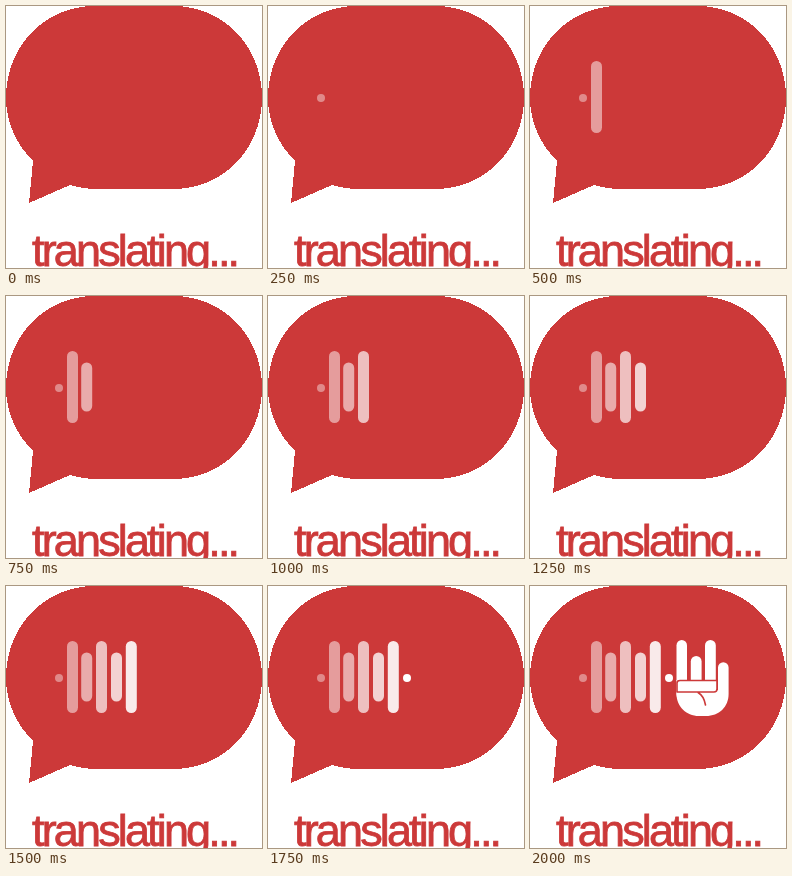
These frames come from a looping animation (256 px wide and 262 px high, 2.25 s). An HTML page:

```html
<!DOCTYPE html>
<html lang="en">
<head>
<meta charset="utf-8">
<title>translating...</title>
<style>
  html, body { margin: 0; width: 100%; height: 100%; overflow: hidden; background: #fff; }
  svg { display: block; width: 256px; height: 262px; }
  text { font: 45px "Liberation Sans", Arial, sans-serif; letter-spacing: -2.85px; stroke-width: .8; }
  .red { fill: #cc3939; stroke: #cc3939; }
  .line { fill: none; stroke: #cc3939; stroke-width: 1.6; stroke-linecap: round; stroke-linejoin: round; }
  .part { fill: #fff; opacity: 0; }
</style>
</head>
<body>
<svg viewBox="0 0 256 262">
  <path fill="#cc3939" shape-rendering="crispEdges" d="M89 0H167C218 0 256 41 256 91.500S218 183 167 183H91Q77 183 64 179L23 197L27 155C10 138 0 116 0 91.500C0 41 38 0 89 0Z"/>
  <text class="red" x="26" y="259.500">translating...</text>
  <g id="wave"></g>
  <g id="hand" class="part">
    <rect x="146.500" y="54" width="10.500" height="60" rx="5.250"/>
    <rect x="160.800" y="70" width="10.800" height="40" rx="5.400"/>
    <rect x="175" y="54" width="10.800" height="60" rx="5.400"/>
    <path d="M146.500 94H187V104H188V81.500A5.300 5.300 0 0 1 198.600 81.500V108C198.600 121 189 130 176 130H169C156 130 146.500 120 146.500 108Z"/>
    <path class="line" d="M147 106V97Q147 94.500 150 94.500H187V103Q187 106 184 106H147M168 106.500Q174 110 175.500 119"/>
  </g>
</svg>
<script>
const STEP = 250, LOOP = 2250, MID = 92;
const wave = document.getElementById("wave");

// centre x, width, height, opacity; one part per step
const parts = [
  [53, 8, 8, .41],
  [66.5, 11, 72, .5],
  [80.7, 11, 49, .58],
  [95.5, 11, 72, .68],
  [110.5, 11, 49, .78],
  [125.3, 11, 72, .9],
  [139, 8, 8, 1]
];

function reveal(el, step, opacity) {
  const offset = step * STEP / LOOP;
  el.animate([
    { opacity: 0, offset: 0 },
    { opacity: 0, offset },
    { opacity, offset },
    { opacity, offset: 1 }
  ], { duration: LOOP, iterations: Infinity });
}

function bar([x, width, height, opacity], i) {
  const el = document.createElementNS("http://www.w3.org/2000/svg", "rect");
  const box = { x: x - width / 2, y: MID - height / 2 - (height > 8 ? 1 : 0), width, height, rx: width / 2 };
  for (const key in box) el.setAttribute(key, box[key]);
  el.setAttribute("class", "part");
  wave.append(el);
  reveal(el, i + 1, opacity);
}

parts.forEach(bar);
reveal(document.getElementById("hand"), parts.length + 1, 1);
</script>
</body>
</html>
```
